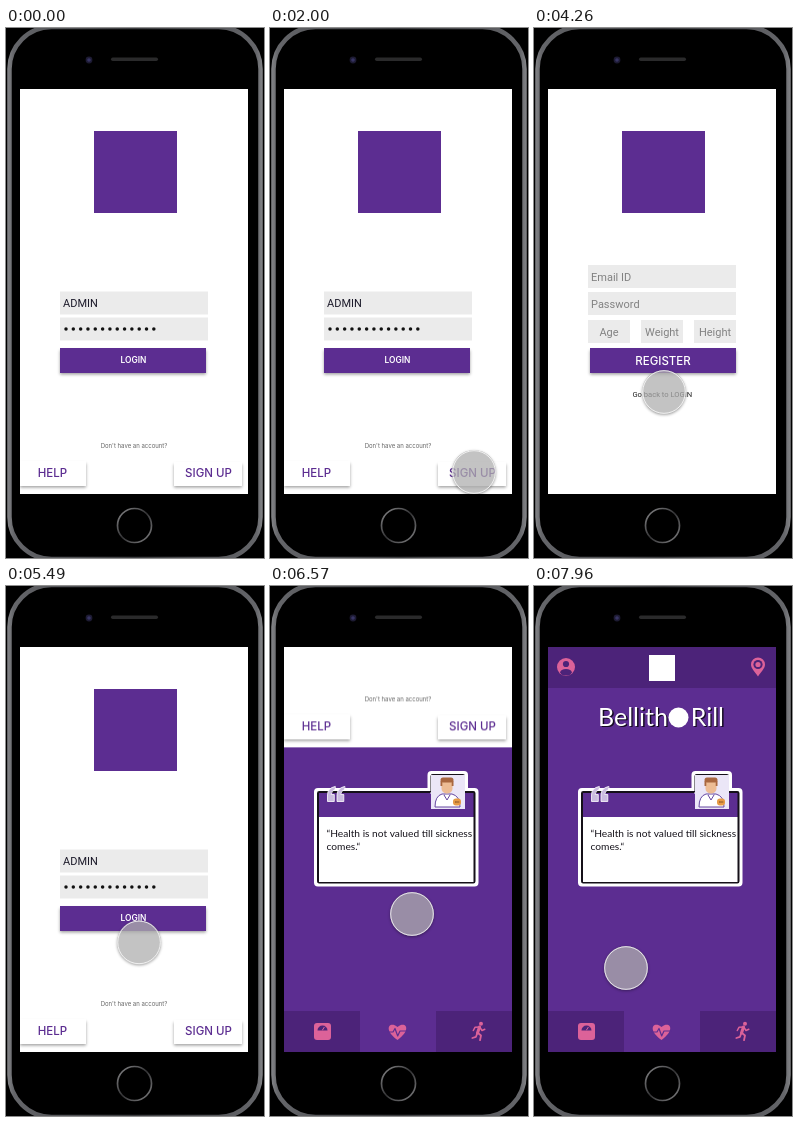
An HTML page with a canvas that plays this animation: 258x530 px, repeating every 8 s.

```html
<!DOCTYPE html>
<html lang="en">
<head>
<meta charset="utf-8">
<title>Health app prototype</title>
<style>
html, body { margin: 0; width: 100%; height: 100%; overflow: hidden; background: #000; }
canvas { display: block; width: 258px; height: 530px; }
</style>
</head>
<body>
<canvas id="stage"></canvas>
<script>
const W = 258, H = 530, LOOP = 8000;
const SCREEN = { x: 14, y: 61, w: 228, h: 405 };
const PURPLE = '#5c2d91', DEEP = '#4c2379', PINK = '#dc6299', FIELD = '#ebebeb';
const ROBOTO = 'Roboto, sans-serif', INTER = 'Inter, sans-serif', LATO = 'Lato, sans-serif';
const ratio = Math.max(1, window.devicePixelRatio || 1);

function setup(canvas) {
  canvas.width = W * ratio;
  canvas.height = H * ratio;
  const ctx = canvas.getContext('2d');
  ctx.scale(ratio, ratio);
  return ctx;
}

const view = setup(document.getElementById('stage'));
let g = view;

function layer(draw) {
  const canvas = document.createElement('canvas');
  g = setup(canvas);
  draw();
  g = view;
  return canvas;
}

function box(x, y, w, h, color) {
  g.fillStyle = color;
  g.fillRect(x, y, w, h);
}

function round(x, y, w, h, r, color) {
  g.fillStyle = color;
  g.beginPath();
  g.roundRect(x, y, w, h, r);
  g.fill();
}

function disc(x, y, r, color) {
  g.fillStyle = color;
  g.beginPath();
  g.arc(x, y, r, 0, Math.PI * 2);
  g.fill();
}

function line(points, color, width) {
  g.strokeStyle = color;
  g.lineWidth = width;
  g.lineCap = g.lineJoin = 'round';
  g.beginPath();
  points.forEach(([x, y]) => g.lineTo(x, y));
  g.stroke();
}

function label(str, x, y, font, color, align = 'left') {
  g.font = font;
  g.fillStyle = color;
  g.textAlign = align;
  g.fillText(str, x, y);
}

function raised(x, y, w, h, color) {
  g.save();
  g.shadowColor = 'rgba(0,0,0,.38)';
  g.shadowBlur = 3 * ratio;
  g.shadowOffsetY = 1.5 * ratio;
  box(x, y, w, h, color);
  g.restore();
}

function clipScreen() {
  g.beginPath();
  g.rect(SCREEN.x, SCREEN.y, SCREEN.w, SCREEN.h);
  g.clip();
}

function phone() {
  box(0, 0, W, H, '#000');
  const metal = g.createLinearGradient(0, 0, W, 0);
  metal.addColorStop(0, '#8a8b8e');
  metal.addColorStop(0.03, '#65666a');
  metal.addColorStop(0.5, '#3c3d40');
  metal.addColorStop(0.97, '#65666a');
  metal.addColorStop(1, '#8a8b8e');
  g.beginPath();
  g.roundRect(3.5, -1, 251, 532, 42);
  g.strokeStyle = metal;
  g.lineWidth = 4.5;
  g.stroke();
  disc(83, 32, 3.4, '#1d1b33');
  disc(83, 32, 1.8, '#373463');
  round(105, 29.5, 47, 3.5, 1.7, '#2a2a2b');
  const ring = g.createLinearGradient(112, 480, 145, 514);
  ring.addColorStop(0, '#8d8d8f');
  ring.addColorStop(0.5, '#343436');
  ring.addColorStop(1, '#808082');
  g.beginPath();
  g.arc(128.5, 497.5, 17, 0, Math.PI * 2);
  g.strokeStyle = ring;
  g.lineWidth = 1.7;
  g.stroke();
}

function whitePage() {
  box(SCREEN.x, SCREEN.y, SCREEN.w, SCREEN.h, '#fff');
  box(88, 103, 83, 82, PURPLE);
}

function login() {
  clipScreen();
  whitePage();
  box(54, 263.5, 148, 23, FIELD);
  box(54, 289.5, 148, 23, FIELD);
  label('ADMIN', 57, 279, '11px ' + ROBOTO, '#1c1a2a');
  for (let i = 0; i < 13; i++) disc(60 + i * 7.32, 301, 1.75, '#111');
  raised(54, 320, 146, 25, PURPLE);
  label('LOGIN', 127.5, 335, '600 8.4px ' + INTER, '#fff', 'center');
  label("Don't have an account?", 128, 420, '6px ' + INTER, '#666', 'center');
  raised(14, 433, 66, 25, '#fff');
  raised(168, 434, 68, 24, '#fff');
  label('HELP', 46.5, 449, '500 11.5px ' + INTER, PURPLE, 'center');
  label('SIGN UP', 202.5, 449, '500 11.5px ' + INTER, PURPLE, 'center');
}

function register() {
  clipScreen();
  whitePage();
  box(54, 237, 148, 23, FIELD);
  box(54, 264, 148, 23, FIELD);
  const font = '11px ' + ROBOTO, gray = '#828282';
  label('Email ID', 57, 253, font, gray);
  label('Password', 57, 279.5, font, gray);
  ['Age', 'Weight', 'Height'].forEach((name, i) => {
    box(54 + i * 53, 292, 42, 23, FIELD);
    label(name, 75 + i * 53, 307.5, font, gray, 'center');
  });
  raised(56, 320, 146, 25, PURPLE);
  label('REGISTER', 129, 336.5, '500 11.5px ' + INTER, '#fff', 'center');
  label('Go back to LOGIN', 128.3, 369, '7.6px ' + ROBOTO, '#222', 'center');
}

function topBar() {
  box(14, 61, 228, 41, DEEP);
  disc(32, 81, 9, PINK);
  disc(32, 78, 3.1, DEEP);
  g.fillStyle = DEEP;
  g.beginPath();
  g.ellipse(32, 86.3, 5.8, 3.3, 0, 0, Math.PI * 2);
  g.fill();
  box(115, 69, 26, 26, '#fff');
  g.fillStyle = PINK;
  g.beginPath();
  g.moveTo(224, 90.5);
  g.bezierCurveTo(221, 86, 217, 82.5, 217, 78.5);
  g.arc(224, 78.5, 7, Math.PI, 0);
  g.bezierCurveTo(231, 82.5, 227, 86, 224, 90.5);
  g.fill();
  disc(224, 78.5, 4.6, DEEP);
  disc(224, 78.5, 2.6, PINK);
}

function title() {
  const draw = (d, color) => {
    label('Bellith', 64 + d, 140 + d, '25px ' + LATO, color);
    label('Rill', 190 + d, 140 + d, '25px ' + LATO, color, 'right');
  };
  draw(1.4, '#140a20');
  draw(0, '#fff');
  disc(144.5, 131.5, 10, '#fff');
}

function cardShape(inset, color) {
  const i = inset;
  g.fillStyle = color;
  g.beginPath();
  g.roundRect(44 + i, 202 + i, 164.5 - 2 * i, 98.5 - 2 * i, 4 - i * 0.6);
  g.roundRect(157.5 + i, 185 + i, 40.5 - 2 * i, 42, 4 - i * 0.6);
  g.fill();
}

function avatar() {
  box(161, 189, 34, 34, '#ebe6f7');
  g.fillStyle = '#fff';
  g.beginPath();
  g.moveTo(165, 221);
  g.quadraticCurveTo(165, 210, 172, 208);
  g.lineTo(182, 208);
  g.quadraticCurveTo(190, 210, 190, 221);
  g.closePath();
  g.fill();
  g.strokeStyle = '#6546a0';
  g.lineWidth = 1;
  g.stroke();
  line([[174, 209], [177, 214], [180, 209]], '#6546a0', 1);
  round(171.5, 193, 11, 14.5, 5, '#edbc94');
  round(170.5, 191.5, 13, 5, 2.5, '#a9673f');
  box(170.5, 195, 1.8, 5, '#a9673f');
  box(181.7, 195, 1.8, 5, '#a9673f');
  round(183, 212.5, 8, 7, 3, '#e79a45');
  line([[185, 216], [189, 216]], '#70451f', 0.8);
}

function quoteMark(x) {
  g.fillStyle = '#cbbde0';
  g.strokeStyle = '#fff';
  g.lineWidth = 0.8;
  g.beginPath();
  g.moveTo(x + 7.5, 200.5);
  g.quadraticCurveTo(x, 202, x, 209);
  g.lineTo(x, 215.5);
  g.lineTo(x + 6.8, 215.5);
  g.lineTo(x + 6.8, 208.5);
  g.lineTo(x + 3.7, 208.5);
  g.quadraticCurveTo(x + 4, 204.8, x + 7.5, 203.5);
  g.closePath();
  g.fill();
  g.stroke();
}

function card() {
  cardShape(0, '#fff');
  cardShape(3, '#151019');
  box(49, 207, 154.5, 24, PURPLE);
  box(49, 231, 154.5, 65, '#fff');
  cardTab();
  quoteMark(57.5);
  quoteMark(67);
  const font = '10.2px ' + LATO;
  label('“Health is not valued till sickness', 56.5, 251, font, '#17141c');
  label('comes.“', 56.5, 264, font, '#17141c');
}

function cardTab() {
  box(160.5, 206, 34.5, 2, '#ebe6f7');
  avatar();
}

function tabs() {
  box(14, 425, 76, 41, DEEP);
  box(166, 425, 76, 41, DEEP);
  round(44, 437, 17, 17, 3, PINK);
  g.fillStyle = DEEP;
  g.beginPath();
  g.arc(52.5, 444.5, 5, Math.PI, 0);
  g.closePath();
  g.fill();
  line([[52.5, 444], [54.2, 441.3]], PINK, 1);
  g.fillStyle = PINK;
  g.beginPath();
  g.moveTo(127.5, 454);
  g.bezierCurveTo(113, 444, 119, 434.5, 127.5, 441);
  g.bezierCurveTo(136, 434.5, 142, 444, 127.5, 454);
  g.fill();
  line([[118.5, 446], [123, 446], [125, 442.5], [127.7, 450], [130, 445], [136.5, 445]], PURPLE, 1.2);
  disc(211, 437.7, 2, PINK);
  line([[209.5, 441], [207.5, 447]], PINK, 3);
  line([[209.5, 441], [205, 441.3], [203.3, 444.5]], PINK, 1.5);
  line([[210, 441.5], [212, 444.5], [214.8, 443.3]], PINK, 1.5);
  line([[208, 447], [211, 449.5], [210, 454.2]], PINK, 1.8);
  line([[207.3, 447], [206, 450.8], [202.3, 452]], PINK, 1.8);
}

function home() {
  clipScreen();
  box(SCREEN.x, SCREEN.y, SCREEN.w, SCREEN.h, PURPLE);
  topBar();
  title();
  card();
  tabs();
}

const pages = { phone: layer(phone), login: layer(login), register: layer(register), home: layer(home) };

// pointer path: time, x, y
const path = [
  [640, 150, 556], [1090, 144.5, 378], [1480, 202, 448], [1780, 202, 448], [2000, 204, 444],
  [2120, 204, 444], [2260, 203, 441], [3230, 203, 441], [3730, 131.5, 364], [4040, 130.5, 364.5],
  [4110, 130, 365.5], [4260, 130, 364], [5400, 130, 364], [5490, 133, 356.5], [5650, 141, 340],
  [5810, 141, 340], [5890, 139, 341], [6030, 142, 328], [7120, 142, 328], [7350, 134.5, 364],
  [7510, 134.5, 364], [7600, 135, 353], [7960, 92, 382], [8000, 92, 382]
];

const clamp = v => Math.min(1, Math.max(0, v));
const span = (t, from, to) => clamp((t - from) / (to - from));
const ease = p => (1 - Math.cos(Math.PI * p)) / 2;

function pointer(t) {
  if (t < path[0][0]) return;
  const k = path.findIndex(p => p[0] > t);
  const [t0, x0, y0] = path[k - 1], [t1, x1, y1] = path[k];
  const p = t1 - t0 < 200 ? span(t, t0, t1) : ease(span(t, t0, t1));
  const x = x0 + (x1 - x0) * p, y = y0 + (y1 - y0) * p;
  g.save();
  // soft shadow only outside the disc
  g.beginPath();
  g.rect(0, 0, W, H);
  g.arc(x, y, 22, 0, Math.PI * 2);
  g.clip('evenodd');
  g.shadowColor = 'rgba(0,0,0,.4)';
  g.shadowBlur = 3 * ratio;
  g.shadowOffsetY = ratio;
  disc(x, y, 21.8, '#888');
  g.restore();
  disc(x, y, 22, 'rgba(174,174,174,.74)');
  g.strokeStyle = 'rgba(255,255,255,.75)';
  g.lineWidth = 1;
  g.beginPath();
  g.arc(x, y, 21.3, 0, Math.PI * 2);
  g.stroke();
}

function show(page, alpha = 1, dy = 0) {
  g.globalAlpha = alpha;
  g.drawImage(page, 0, dy, W, H);
  g.globalAlpha = 1;
}

function render(t) {
  show(pages.phone);
  g.save();
  clipScreen();
  const slide = t < 6740 ? ease(span(t, 6170, 6770)) : 1;
  if (slide > 0) show(pages.home);
  if (slide < 1) show(pages.login, 1, -SCREEN.h * slide);
  const fade = span(t, 2130, 2540) - span(t, 4265, 4500);
  if (fade > 0) show(pages.register, fade);
  g.restore();
  pointer(t);
}

const start = performance.now();
function tick() {
  render((performance.now() - start) % LOOP);
  requestAnimationFrame(tick);
}
tick();
</script>
</body>
</html>
```
